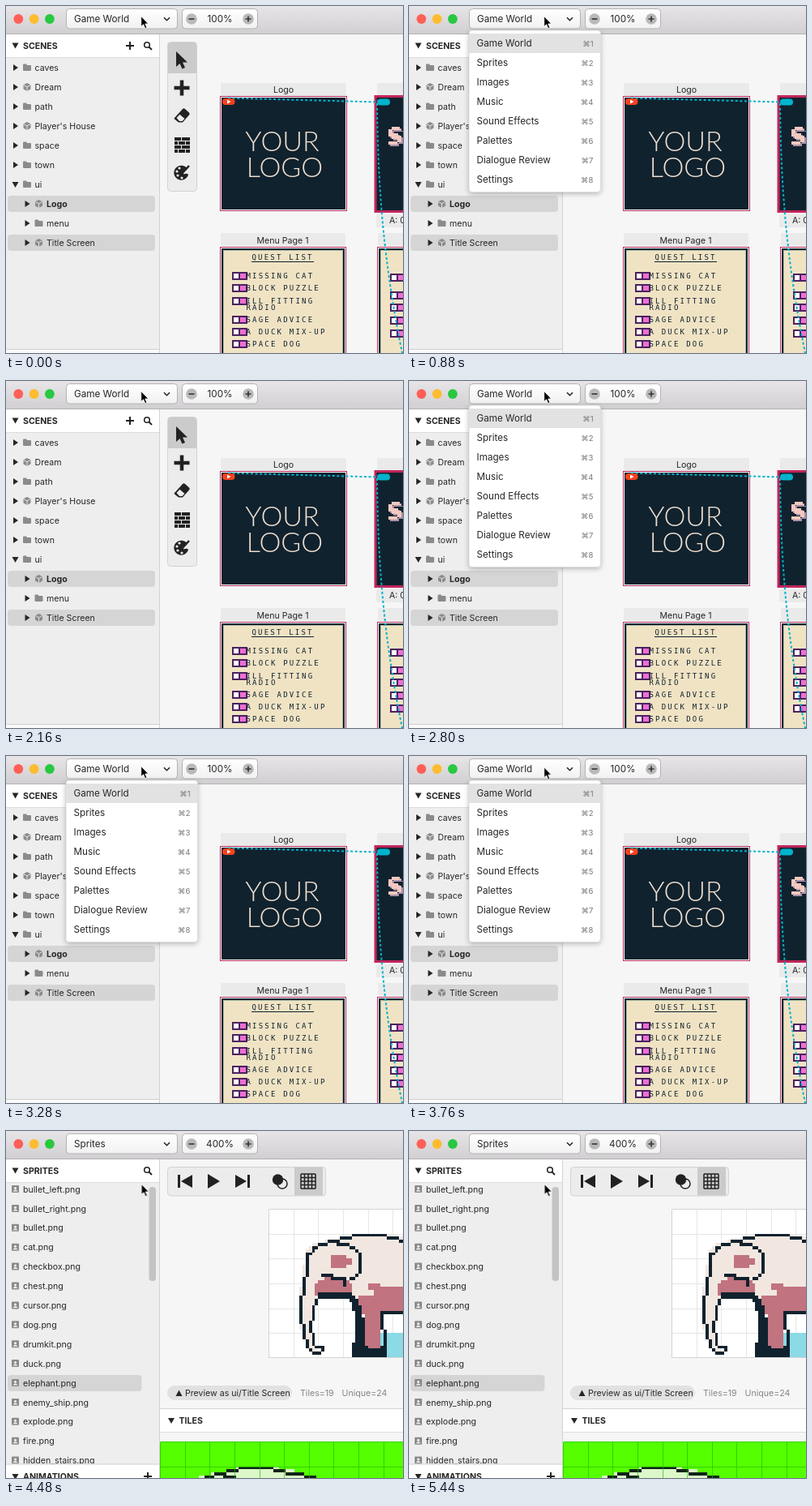
An HTML page that plays this animation: 490x428 px, repeating every 5.52 s.

```html
<!DOCTYPE html>
<html lang="en">
<head>
<meta charset="utf-8">
<title>Game editor navigation</title>
<style>
html, body { margin: 0; width: 100%; height: 100%; overflow: hidden; background: #f6f6f6; }
svg { display: block; width: 490px; height: 428px; }
text { font-family: Inter, "Open Sans", sans-serif; font-size: 10.6px; fill: #262626; white-space: pre; }
.bar { font-size: 11.7px; }
.head { font-weight: 700; }
.mid { text-anchor: middle; }
.key { font-size: 9.5px; fill: #777; text-anchor: end; }
.dim { fill: #858585; }
.logo { font: 300 34px Lato, sans-serif; fill: #f0dfd0; text-anchor: middle; }
.pixel { font: 9px "DejaVu Sans Mono", monospace; letter-spacing: 2.2px; fill: #10222e; }
.crisp { shape-rendering: crispEdges; }
.line { fill: none; stroke: #262626; stroke-width: 1.6; }
.wire { fill: none; stroke: #00b3cc; stroke-width: 2; stroke-dasharray: 3 2.6; }

.world, .sprites, .menu, .pickA, .pickB { animation: world 5520ms step-end infinite; }
.sprites { animation-name: sprites; }
.menu { animation-name: menu; }
.pickA { animation-name: pickA; }
.pickB { animation-name: pickB; }
.cursor { animation: cursor 5520ms ease-in-out infinite; }
@keyframes world { 0% { opacity: 1 } 79.71%, 100% { opacity: 0 } }
@keyframes sprites { 0% { opacity: 0 } 79.71%, 100% { opacity: 1 } }
@keyframes menu {
  0% { opacity: 0 } 14.49% { opacity: 1 } 28.98% { opacity: 0 }
  49.27% { opacity: 1 } 79.71%, 100% { opacity: 0 }
}
@keyframes pickA { 0% { opacity: 1 } 72.46%, 100% { opacity: 0 } }
@keyframes pickB { 0% { opacity: 0 } 72.46%, 100% { opacity: 1 } }
@keyframes cursor {
  0%, 67.4% { transform: translate(0, 0) }
  74%, 100% { transform: translate(.5px, 53px) }
}
</style>
</head>
<body>
<svg id="stage" viewBox="0 0 490 428">
  <defs>
    <linearGradient id="chrome" x2="0" y2="1"><stop stop-color="#e7e5e7"/><stop offset="1" stop-color="#d1cfd1"/></linearGradient>
    <linearGradient id="button" x2="0" y2="1"><stop stop-color="#fff"/><stop offset="1" stop-color="#f1f1f1"/></linearGradient>
    <filter id="shadow" x="-10%" y="-10%" width="120%" height="125%"><feDropShadow dx="0" dy="2" stdDeviation="3" flood-opacity=".28"/></filter>
    <clipPath id="list"><path d="M0 64H189V410.500H0z"/></clipPath>
    <clipPath id="canvas"><path d="M324 96H490V280H324z"/></clipPath>
    <clipPath id="tiles"><path d="M190 383H490V428H190z"/></clipPath>
    <g id="folder"><path d="M0 1.500q0-1 1-1h3l1 1.500h4q1 0 1 1V8q0 1-1 1H1q-1 0-1-1z" fill="#8b8b8b"/></g>
    <g id="cube"><path d="M5 0L9.500 2.300V7.600L5 10 .5 7.600V2.300z" fill="#8b8b8b"/><path d="M.8 2.600L5 4.800 9.200 2.600M5 4.800V10" fill="none" stroke="#eee" stroke-width=".9"/></g>
    <g id="image"><rect width="9" height="9" rx="1" fill="#8b8b8b"/><circle cx="4.500" cy="3.500" r="1.500" fill="#f4f4f4"/><path d="M1.500 7.500q3-4 6 0z" fill="#f4f4f4"/></g>
    <path id="closed" d="M0-4L6 0 0 4z" fill="#262626"/>
    <path id="open" d="M-4-3H4L0 4z" fill="#262626"/>
    <path id="plus" d="M-5 0H5M0-5V5" stroke="#222" stroke-width="2"/>
    <g id="search" class="line"><circle cx="-1" cy="-1" r="3.300"/><path d="M1.500 1.500L5 5" stroke-width="2"/></g>
    <g id="check" class="crisp" stroke="#4b2260" stroke-width="1.500"><path d="M0-4H8V4H0z" fill="#fff"/><path d="M8-4H17V4H8z" fill="#ee6fd3"/></g>
  </defs>
</svg>
<script>
const text = (x, y, s, cls = '') => `<text x="${x}" y="${y}" class="${cls}">${s}</text>`;
const box = (x, y, w, h, fill, more = '') => `<rect x="${x}" y="${y}" width="${w}" height="${h}" fill="${fill}" ${more}/>`;
const use = (id, x, y) => `<use href="#${id}" x="${x}" y="${y}"/>`;
const path = (d, more = '') => `<path d="${d}" ${more}/>`;
const group = (cls, ...parts) => `<g class="${cls}">${parts.join('')}</g>`;
const range = n => [...Array(n).keys()];

function topBar(name, zoom) {
  const round = (x, glyph) => `<circle cx="${x}" cy="16" r="6.8" fill="#b9b9b9"/>` +
    path(glyph, 'stroke="#333" stroke-width="1.6"');
  return box(0, 0, 490, 34, 'url(#chrome)') + box(0, 34, 490, 1, '#b4b2b4') +
    ['#ff5f57', '#febc2e', '#28c840'].map((c, i) =>
      `<circle cx="${15.3 + i * 19.3}" cy="16" r="5.9" fill="${c}"/>`).join('') +
    box(74.5, 3.5, 137, 24.5, 'url(#button)', 'rx="4" stroke="#b3b3b3"') +
    text(84, 20, name, 'bar') + path('M195 14.200l3.500 3.500 3.500-3.500', 'class="line"') +
    box(217.5, 3.5, 93, 24.500, 'url(#button)', 'rx="4" stroke="#b3b3b3"') +
    round(229, 'M225.500 16h7') + round(299, 'M295.500 16h7M299 12.500v7') +
    text(264, 20, zoom, 'bar mid');
}

const sideHead = (title, y) => use('open', 11.5, y) + text(21, y + 4, title, 'head');

function sceneList() {
  const rows = ['folder caves', 'cube Dream', 'folder path', "cube Player's House", 'folder space',
    'folder town', 'folder ui', 'cube Logo', 'folder menu', 'cube Title Screen'];
  return rows.map((row, i) => {
    const cut = row.indexOf(' '), y = 76 + i * 24, dx = i > 6 ? 14.5 : 0;
    const mark = i === 7 || i === 9 ? box(2, y - 10, 182, 20, '#d5d5d5', 'rx="4"') : '';
    return mark + (i === 6 ? use('open', 11.5, y) : use('closed', 9 + dx, y)) +
      use(row.slice(0, cut), 21 + dx, y - 5) +
      text(35.5 + dx, y + 4, row.slice(cut + 1), i === 7 ? 'head' : '');
  }).join('');
}

function tools() {
  const brick = (x, y, w) => box(x, y, w, 4, '#222');
  return box(199.5, 44.5, 36, 184, '#ececec', 'rx="4" stroke="#d2d2d2"') +
    path('M200 83V48q0-3 3-3h29q3 0 3 3V83z', 'fill="#cbcbcb"') +
    path('M210 56V75l4.500-4 3 6.500 3.500-1.500-3-6.500h6z', 'fill="#222"') +
    path('M207.500 101h19M217 91.500v19', 'stroke="#222" stroke-width="4.500"') +
    path('M208 138l10-11q1.500-1.500 3 0l5 4.500q1.500 1.500 0 3l-8 9h-5l-5-4q-1-.7 0-1.500z', 'fill="#222"') +
    path('M210.500 138l4-4.300 6 5.300-3 3h-3.500z', 'fill="#ececec"') +
    [0, 1, 2, 3].map(i => i % 2
      ? brick(208, 162 + i * 5, 4) + brick(213, 162 + i * 5, 8) + brick(222, 162 + i * 5, 5)
      : brick(208, 162 + i * 5, 8) + brick(217, 162 + i * 5, 10)).join('') +
    path('M224 201a9 9 0 1 0 1 7q-1-2-4-1-3 1-3-2z', 'fill="#222"') +
    [[211, 204], [214, 200], [212, 209], [217, 212]].map(([x, y]) =>
      `<circle cx="${x}" cy="${y}" r="1.6" fill="#ececec"/>`).join('') +
    path('M216 208L226 197', 'stroke="#222" stroke-width="2.500"');
}

function page(x, w) {
  return box(x, 280, w, 16, '#eaeaea', 'rx="2"') +
    box(x - 1, 297, w + 2, 140, '#b82a5e') + box(x, 298, w, 140, '#fff') +
    box(x + 1, 299, w - 2, 140, '#10222e') + box(x + 3, 301, w - 6, 140, '#9fb5a0') +
    box(x + 4, 302, w - 8, 140, '#f0e3c4');
}

function world() {
  const quests = [['MISSING CAT', 333], ['BLOCK PUZZLE', 348], ['ILL FITTING', 364],
    ['SAGE ADVICE', 387], ['A DUCK MIX-UP', 402], ['SPACE DOG', 417]];
  return group('world',
    box(190, 35, 300, 393, '#f6f6f6'),
    box(265, 95, 155, 16, '#eaeaea', 'rx="2"'), text(342.5, 107, 'Logo', 'mid'),
    box(264, 111, 157, 142, '#b82a5e'), box(265, 112, 155, 140, '#fff'),
    box(266, 113, 153, 138, '#10222e'),
    text(341, 179, 'YOUR', 'logo'), text(344, 211, 'LOGO', 'logo'),
    box(458, 95, 40, 15, '#eaeaea', 'rx="2"'),
    box(454.5, 110, 50, 145, '#c2255c'), box(457.5, 113, 50, 139, '#10222e'),
    path('M490 152h-4v-3h-10v3h-4v9h4v3h7v3h-11v4h11v-3h5v-8h-4v-3h-7v-4h9z', 'class="crisp" fill="#a88fa8" transform="translate(2 2)"'),
    path('M490 152h-4v-3h-10v3h-4v9h4v3h7v3h-11v4h11v-3h5v-8h-4v-3h-7v-4h9z', 'class="crisp" fill="#f3c9c0"'),
    box(457, 257, 40, 16, '#eaeaea', 'rx="2"'), text(473, 268, 'A: 0'),
    page(265, 154), text(341.5, 293, 'Menu Page 1', 'mid'),
    text(303.5, 313, 'QUEST LIST', 'pixel'), box(303, 315, 77, 1, '#10222e'),
    ...quests.map(([name, y]) => use('check', 280, y) + text(296.5, y + 3.3, name, 'pixel')),
    text(296.5, 374.5, 'RADIO', 'pixel'),
    page(459, 154),
    ...[335, 357, 372, 388, 404].map(y => use('check', 475, y)),
    path('M274 113.500L458 118.500', 'class="wire"'),
    path('M458 120C459 230 467 320 489 428', 'class="wire"'),
    box(267, 114, 15.5, 8, '#f4421f', 'rx="4"'), path('M273 115.500l4.500 2.500-4.500 2.500z', 'fill="#fff"'),
    box(458, 114.500, 16, 8, '#00b3cc', 'rx="4"'),
    tools(),
    box(0, 35, 189, 393, '#eee'), box(0, 35, 189, 28, '#fff'), box(0, 63, 189, 1, '#dcdcdc'),
    sideHead('SCENES', 48.5), use('plus', 153, 49), use('search', 175, 49), sceneList(),
    box(0, 423, 189, 5, '#fafafa'), box(0, 423, 189, 1, '#cfcfcf'), box(189, 35, 1, 393, '#d3d3d3'),
    topBar('Game World', '100%'));
}

// Pixel art: outlines and areas are rasterised on a unit grid.
const points = s => s.split(' ').map(p => p.split(',').map(Number));
const dot = (x, y) => `M${x} ${y}h1v1h-1z`;

function stroke(s) {
  const p = points(s);
  return p.slice(1).map(([x2, y2], i) => {
    const [x1, y1] = p[i], n = Math.max(Math.abs(x2 - x1), Math.abs(y2 - y1), 1);
    return range(n + 1).map(k => dot(Math.round(x1 + (x2 - x1) * k / n), Math.round(y1 + (y2 - y1) * k / n))).join('');
  }).join('');
}

function area(s) {
  const p = points(s);
  const inside = (x, y) => p.reduce((hit, [x1, y1], i) => {
    const [x2, y2] = p[(i + 1) % p.length];
    return (y1 > y) !== (y2 > y) && x < x1 + (x2 - x1) * (y - y1) / (y2 - y1) ? !hit : hit;
  }, false);
  return range(49).map(y => range(60).filter(x => inside(x + .5, y + .5)).map(x => dot(x, y)).join('')).join('');
}

function elephant(x, y, skin, dark, pink, sky) {
  const layer = (fill, ...d) => path(d.join(''), `fill="${fill}"`);
  return `<g class="crisp" transform="translate(${x} ${y}) scale(3.83)">` +
    layer(sky, area('36,40 60,40 60,48 36,48')) +
    layer(skin, area('10,28 11,22 12,14 15,11 22,10 27,8 38,8 47,10 52,12 60,13 60,34 31,34 31,29 16,28 15,30 14,36 15,44 17,46 13,46 10,37')) +
    layer(pink,
      area('20,15 25,15 25,16 27,16 27,18 25,18 25,19 20,19'),
      area('16,23 20,22 23,23 25,22 27,24 27,28 15,28 15,25'),
      area('32,24 36,24 36,25 60,25 60,33 36,33 36,45 31,45 31,35 29,31 29,28 34,28 34,26 32,26')) +
    layer(dark,
      stroke('20,10 16,11 14,12 13,14 12,14 12,21 11,22 11,27 10,28 10,36 11,37 11,41 12,42 12,44 13,45 14,46 16,46 17,45 17,44 16,44'),
      stroke('16,27 15,29 14,31 14,34 13,36 13,39 14,41 14,43 15,44'),
      stroke('20,10 25,9 27,8 37,8 38,9 41,9 42,10 47,10 48,11 51,11 52,12 60,14'),
      stroke('22,11 25,11 28,13 29,14 29,19 28,21 26,22'),
      stroke('17,21 20,21 20,22 24,22 24,24'),
      area('17,27 27,27 29,29 30,33 31,37 31,44 33,45 36,45 38,43 38,48 27,48 27,44 28,42 28,36 27,30 25,29 17,29'),
      stroke('36,33 60,33'), stroke('36,34 36,38 37,39 37,43')) + '</g>';
}

function spriteTools() {
  const grid = [0, 1, 2, 3, 4].map(i => `M${364 + i * 4.5} 53v18M364 ${53 + i * 4.5}h18`).join('');
  return box(199.5, 44.5, 195, 35.500, '#ececec', 'rx="4" stroke="#d2d2d2"') +
    box(356, 45, 35, 34.500, '#cbcbcb') +
    path('M212 54h3v16h-3zM230 54v16l-14-8zM249 53l15 9-15 9zM283 54v16l14-8zM298 54h3v16h-3z', 'fill="#222"') +
    '<circle cx="341" cy="65" r="6" fill="none" stroke="#222" stroke-width="1.5"/><circle cx="335.5" cy="60" r="6.700" fill="#222"/>' +
    path(grid, 'stroke="#222" stroke-width="1.5"');
}

function sprites() {
  const files = 'bullet_left bullet_right bullet cat checkbox chest cursor dog drumkit duck elephant enemy_ship explode fire hidden_stairs'.split(' ');
  const cell = 30.64;
  const lines = (x, y, rows) => range(11).map(i => `M${x + i * cell} ${y}v190`).join('') +
    range(rows).map(i => `M${x} ${y + i * cell}h310`).join('');
  return group('sprites',
    box(190, 35, 300, 393, '#f6f6f6'), spriteTools(),
    box(324, 96, 170, 184, '#fff'),
    `<g clip-path="url(#canvas)">${path(lines(324.5, 96.5, 7), 'class="crisp" stroke="#e6e6e6"')}` +
      `${elephant(324, 96, '#f2e7e0', '#10222e', '#c17380', '#8bdae6')}</g>`,
    path('M490 96.500H324.500V279.500H490', 'fill="none" stroke="#d4d4d4"'),
    box(199, 314, 154, 18, '#e1e1e1', 'rx="9"'),
    path('M209.500 327l4-7.500 4 7.500z', 'fill="#262626"'), text(221, 327, 'Preview as ui/Title Screen'),
    text(363, 327, 'Tiles=19', 'dim'), text(414.5, 327, 'Unique=24', 'dim'),
    box(190, 342, 300, 30, '#fff'), box(190, 342, 300, 1, '#d6d6d6'), box(190, 371, 300, 1, '#dcdcdc'),
    use('open', 204, 357), text(213.5, 361, 'TILES', 'head'),
    `<g clip-path="url(#tiles)">${box(190, 383, 300, 45, '#55ff00')}` +
      `${elephant(184, 383, '#dcf8c8', '#0d2416', '#b7a070', '#80e8a0')}` +
      `${path(lines(190.5, 383.500, 2), 'class="crisp" stroke="#20b800" stroke-opacity=".65"')}</g>`,
    box(0, 35, 189, 393, '#eee'),
    '<g clip-path="url(#list)">' + files.map((name, i) => {
      const y = 72 + i * 23.9;
      return (i === 10 ? box(2, y - 10, 165.500, 20, '#d5d5d5', 'rx="4"') : '') +
        use('image', 7, y - 5) + text(21, y + 3.6, name + '.png');
    }).join('') + '</g>',
    box(176.5, 69, 8.500, 116, '#c3c3c3', 'rx="4"'),
    box(0, 35, 189, 28, '#fff'), box(0, 63, 189, 1, '#dcdcdc'),
    sideHead('SPRITES', 48.5), use('search', 175, 49),
    box(0, 411, 189, 17, '#fff'), box(0, 410.500, 189, 1, '#cfcfcf'),
    sideHead('ANIMATIONS', 426), use('plus', 175, 426),
    box(189, 35, 1, 393, '#d3d3d3'),
    topBar('Sprites', '400%'));
}

function menu() {
  const items = ['Game World', 'Sprites', 'Images', 'Music', 'Sound Effects', 'Palettes', 'Dialogue Review', 'Settings'];
  return group('menu',
    box(74, 30, 162.5, 199.500, '#fff', 'rx="4" filter="url(#shadow)"'),
    box(74, 30, 162.5, 199.500, '#fff', 'rx="4" stroke="#cfcfcf" stroke-width=".7"'),
    box(74, 34, 162.5, 24, '#e2e2e2', 'class="pickA"'),
    box(74, 58, 162.5, 24, '#d7d7d7', 'class="pickB"'),
    ...items.map((name, i) => text(83.5, 50 + i * 24, name, 'bar') + text(227.5, 49.5 + i * 24, '⌘' + (i + 1), 'key')));
}

document.getElementById('stage').insertAdjacentHTML('beforeend',
  world() + sprites() + menu() +
  group('cursor', path('M166.700 12.500v13l2.900-2.700 2.100 4.900 2.200-.9-2.100-4.800h4z', 'fill="#000" stroke="#fff" stroke-width=".9"')));
</script>
</body>
</html>
```
